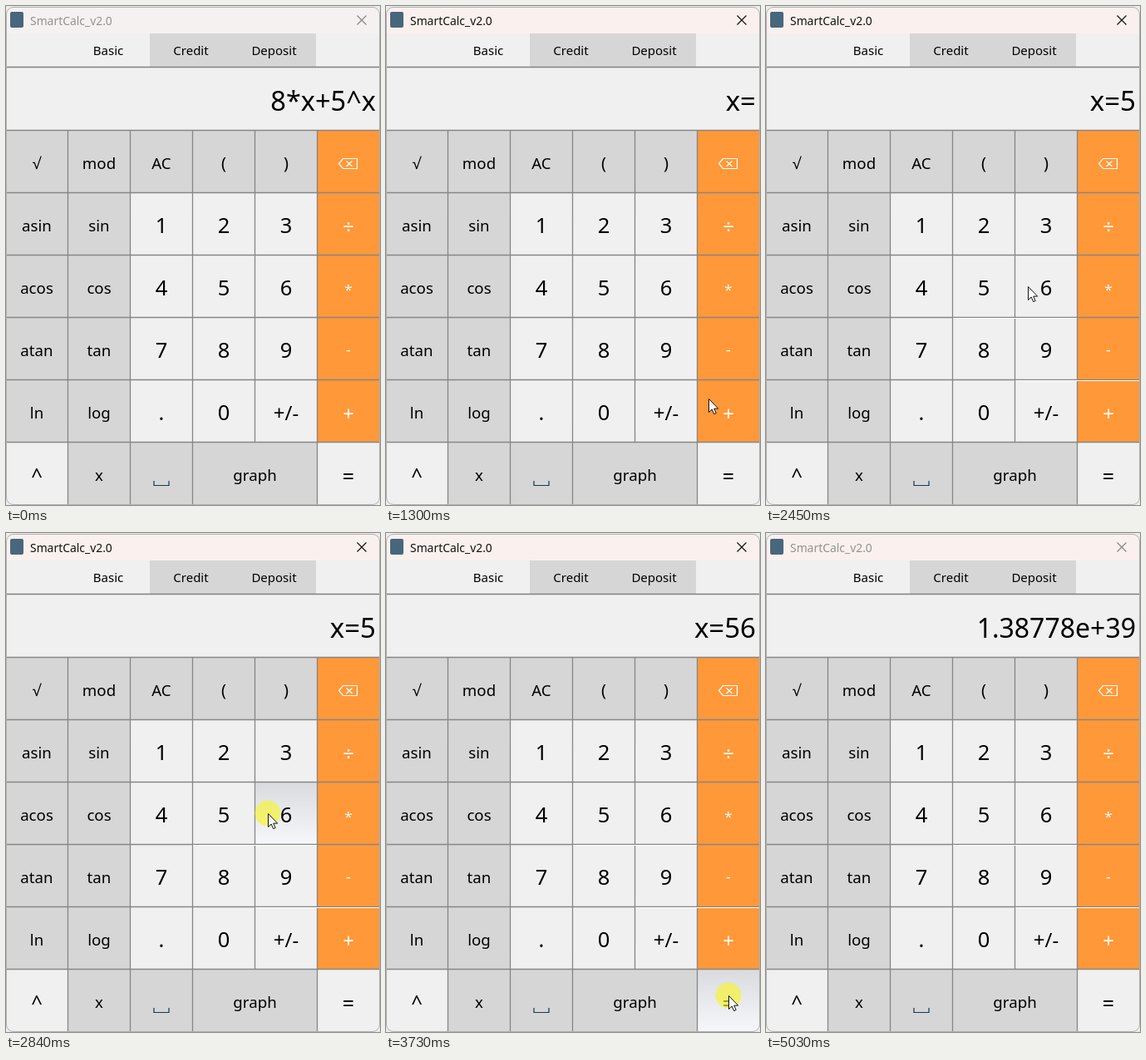
These frames come from a looping animation (450x600 px, 5.1 s). An HTML page:

```html
<!DOCTYPE html>
<html lang="en">
<head>
<meta charset="utf-8">
<title>Calculator</title>
<style>
  html, body { margin: 0; width: 100%; height: 100%; overflow: hidden; background: #ececec; }
  svg { display: block; width: 100%; height: 100%; }
  text { font-family: "Noto Sans", "Open Sans", sans-serif; text-anchor: middle; fill: #000; }
</style>
</head>
<body>
<svg viewBox="0 0 450 600">
  <defs>
    <clipPath id="windowShape"><rect y="1" width="450" height="599" rx="9"/></clipPath>
    <linearGradient id="pressedFill" x2="0" y2="1">
      <stop stop-color="#dadbde"/><stop offset="1" stop-color="#f6f7fa"/>
    </linearGradient>
  </defs>
  <g clip-path="url(#windowShape)">
    <rect width="450" height="600" fill="#f0f0f0"/>
    <rect id="titleBar" width="450" height="33"/>
    <rect x="5" y="7" width="16" height="19" rx="2" fill="#48667c"/>
    <text id="title" x="29" y="22.5" font-size="13.9" style="text-anchor:start">SmartCalc_v2.0</text>
    <path id="close" d="M422.5 11.5l11 11m0-11l-11 11" stroke-width="1.2"/>
    <rect x="173" y="33" width="200" height="40" fill="#d6d6d6"/>
    <g font-size="15">
      <text x="123" y="59">Basic</text>
      <text x="222.5" y="59">Credit</text>
      <text x="322.5" y="59">Deposit</text>
    </g>
    <path d="M0 73.5H450" stroke="#808080" stroke-width="1.3"/>
    <text id="display" x="445" y="126" style="text-anchor:end"></text>
    <g id="keyFaces"></g>
    <rect id="pressed" width="74" height="74" fill="url(#pressedFill)"/>
    <g id="keyLabels"></g>
    <path id="grid" fill="none" stroke="#868686" stroke-width="1.3"/>
    <path id="highlight" d="M225 375.5H374M300 450.5H449" stroke="#fff"/>
    <path d="M405.5 183.5H422.5V195.5H405.5L400.5 189.5ZM409.5 186.5l7 6.500m0-6.500l-7 6.500" fill="none" stroke="#fff" stroke-width="1.2"/>
    <path d="M178 571V576.500H196V571" fill="none" stroke="#18384c" stroke-width="1.2"/>
    <g id="pointer">
      <circle id="halo" r="15.500" fill="#f8f622" fill-opacity=".62"/>
      <path d="M.5 .5V16.500L4.200 13L6.700 18.600L9.200 17.500L6.700 12.100H11.700Z" fill="#fff" stroke="#111"/>
    </g>
  </g>
  <rect x=".5" y="1.500" width="449" height="598" rx="8.500" fill="none" stroke="#b0b0b0"/>
</svg>
<script>
const LOOP = 5100, STEP = 65, CELL = 75, TOP = 150;
const $ = id => document.getElementById(id);
const LIGHT = '#f0f0f0', GREY = '#d6d6d6', ORANGE = '#ff9838';

function add(parent, tag, attrs, content = '') {
  const node = document.createElementNS('http://www.w3.org/2000/svg', tag);
  for (const name in attrs) node.setAttribute(name, attrs[name]);
  node.textContent = content;
  parent.append(node);
}

const rows = [
  ['√', 'mod', 'AC', '(', ')', ''],
  ['asin', 'sin', '1', '2', '3', '÷'],
  ['acos', 'cos', '4', '5', '6', '*'],
  ['atan', 'tan', '7', '8', '9', '-'],
  ['ln', 'log', '.', '0', '+/-', '+'],
  ['^', 'x', '', 'graph', null, '=']
];
// Font size and baseline offset of labels that differ from the usual.
const special = {
  '*': [17, 47], '-': [18, 45], '+': [24, 49], '÷': [24, 49],
  '=': [25, 50], '^': [24, 48], '+/-': [24, 48], '(': [20, 46], ')': [20, 46]
};

rows.forEach((row, r) => row.forEach((label, c) => {
  const x = c * CELL, y = TOP + r * CELL;
  const operator = c === 5 && r < 5;
  const light = r === 5 ? c === 0 || c === 5 : r > 0 && c > 1;
  add($('keyFaces'), 'rect', {
    x, y, width: CELL, height: CELL,
    fill: operator ? ORANGE : light ? LIGHT : GREY
  });
  if (!label) return;
  const [size, base] = special[label] || (/^[\d.]$/.test(label) ? [25.5, 48] : [18.7, 46]);
  add($('keyLabels'), 'text', {
    x: label === 'graph' ? 299.5 : x + 37, y: y + base, 'font-size': size,
    style: operator ? 'fill:#fff' : ''
  }, label);
}));

let lines = '';
for (let i = 0; i < 6; i++) lines += `M0 ${TOP - .5 + i * CELL}H450`;
for (let i = 1; i < 6; i++) lines += `M${i * CELL - .5} ${TOP}V${i === 4 ? 525 : 600}`;
$('grid').setAttribute('d', lines);

// Pointer moves: start, number of steps, curve control, end.
const moves = [
  [70, 6, [410, 580], [407, 552]],
  [1170, 8, [398, 418], [256, 334]],
  [2250, 4, [285, 334], [315, 337]],
  [2980, 8, [428, 425], [415, 553]],
  [3530, 2, [413, 555], [412, 556]],
  [4340, 4, [408, 578], [399, 602]]
];
// Key presses: start, end, column, row.
const presses = [
  [830, 900, 5, 5],
  [2110, 2250, 3, 2],
  [2780, 2980, 4, 2],
  [3730, 3800, 5, 5]
];
// Display: start, text, font size.
const readings = [
  [0, '8*x+5^x', 32.5],
  [900, 'x=', 33],
  [2250, 'x=5', 33],
  [2980, 'x=56', 33],
  [3800, '1.38778e+39', 32]
];

function pointerAt(t) {
  let at = [412, 602];
  for (const [start, steps, bend, end] of moves) {
    if (t < start) break;
    const p = Math.min(1, (Math.floor((t - start) / STEP) + 1) / steps);
    const u = p * p * (3 - 2 * p), v = 1 - u;
    at = at.map((from, i) => v * v * from + 2 * u * v * bend[i] + u * u * end[i]);
  }
  return at.map(Math.round);
}

function draw(t) {
  const active = t >= 70 && t < 5030;
  $('titleBar').setAttribute('fill', t < 70 ? '#f5f1f0' : t < 900 ? '#f4f3f0' : '#faf0ee');
  $('title').style.fill = active ? '#111' : '#929292';
  $('close').setAttribute('stroke', active ? '#111' : '#858585');

  const [, value, size] = readings.filter(r => r[0] <= t).pop();
  $('display').textContent = value;
  $('display').setAttribute('font-size', size);

  const press = presses.find(([start, end]) => t >= start && t < end);
  for (const id of ['pressed', 'halo']) $(id).style.display = press ? '' : 'none';
  if (press) {
    $('pressed').setAttribute('x', press[2] * CELL);
    $('pressed').setAttribute('y', TOP + press[3] * CELL);
  }
  $('highlight').style.display = t >= 2110 ? '' : 'none';
  $('pointer').setAttribute('transform', `translate(${pointerAt(t)})`);
}

const begin = performance.now();
function tick() {
  draw((performance.now() - begin) % LOOP);
  requestAnimationFrame(tick);
}
tick();
</script>
</body>
</html>
```
